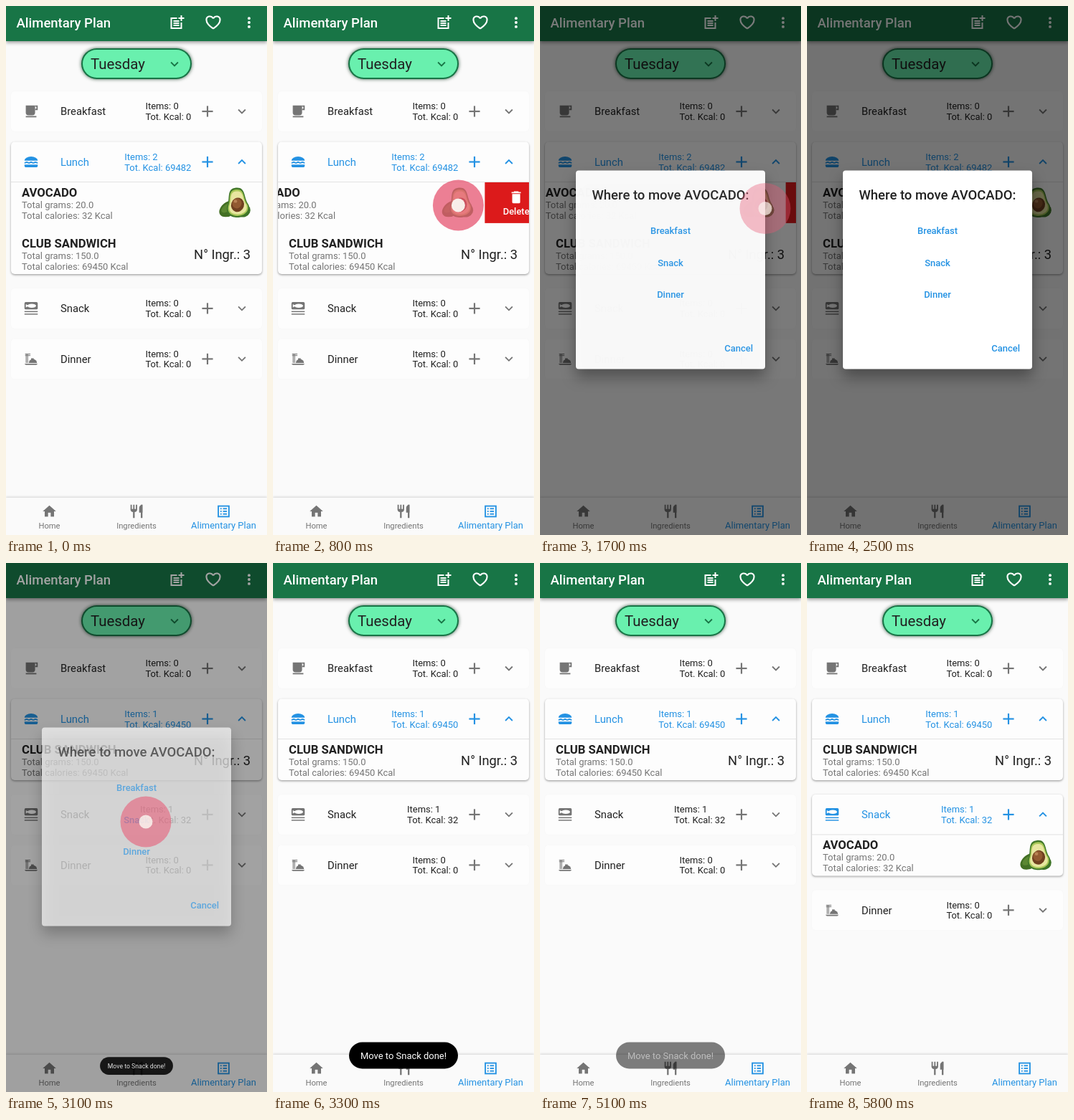
An HTML page with a canvas for the animation above (6 s loop, 364 by 738 pixels).

```html
<!DOCTYPE html>
<html lang="en">
<head>
<meta charset="utf-8">
<title>Alimentary Plan</title>
<style>
  html, body { margin: 0; width: 100%; height: 100%; overflow: hidden; background: #fafafa; }
  canvas { display: block; width: 364px; height: 738px; }
</style>
</head>
<body>
<canvas id="stage"></canvas>
<script>
const W = 364, H = 738, LOOP = 6000, STEP = 100;
const GREEN = '#187546', BLUE = '#2492e3', GREY = '#757575', INK = '#212121';
const CARD = '#fdfdfd', RED = '#dc1a1b', MOVE = '#10b853';
const BODY = 12.96, ROW = 71;

const canvas = document.getElementById('stage');
const dpr = window.devicePixelRatio || 1;
canvas.width = W * dpr;
canvas.height = H * dpr;
const ctx = canvas.getContext('2d');

// Timing: progress from 0 to 1, and easing on top of it
const ramp = (t, start, length) => Math.min(1, Math.max(0, (t - start) / length));
const easeOut = p => 1 - (1 - p) ** 2;
const easeBoth = p => p * p * (3 - 2 * p);
const pulse = (t, start, end) => Math.min(ramp(t, start - 100, 100), 1 - ramp(t, end - 200, 200));

// Shape helpers, all using the current fill and stroke
function bar(x, y, w, h, r = 0) {
  ctx.beginPath();
  ctx.roundRect(x, y, w, h, r);
  ctx.fill();
}

function trace(points) {
  ctx.beginPath();
  for (let i = 0; i < points.length; i += 2) ctx.lineTo(points[i], points[i + 1]);
}

function line(...points) {
  trace(points);
  ctx.stroke();
}

function poly(...points) {
  trace(points);
  ctx.fill();
}

function dome(x, y, rx, ry) {
  ctx.beginPath();
  ctx.ellipse(x, y, rx, ry, 0, Math.PI, 0);
  ctx.fill();
}

function oval(x, y, rx, ry, color, turn = 0) {
  ctx.beginPath();
  ctx.ellipse(x, y, rx, ry, turn, 0, Math.PI * 2);
  ctx.fillStyle = color;
  ctx.fill();
}

function rect(x, y, w, h, color) {
  ctx.fillStyle = color;
  ctx.fillRect(x, y, w, h);
}

function box(x, y, w, h, r, fill, [shade, blur, drop] = ['transparent', 0, 0]) {
  ctx.save();
  ctx.shadowColor = shade;
  ctx.shadowBlur = blur * dpr;
  ctx.shadowOffsetY = drop * dpr;
  ctx.fillStyle = fill;
  bar(x, y, w, h, r);
  ctx.restore();
}

// y is the middle of the capital letters
function text(str, x, y, size, color = INK, weight = 400, align = 'left') {
  ctx.font = `${weight} ${size}px Roboto, sans-serif`;
  ctx.textAlign = align;
  ctx.fillStyle = color;
  ctx.fillText(str, x, y + size * 0.355);
}

// Icons live in a 24 by 24 square
const icons = {
  add() {
    bar(5, 11, 14, 2);
    bar(11, 5, 2, 14);
  },
  chevron() { line(6.7, 9.3, 12, 14.6, 17.3, 9.3); },
  dots() { for (let y = 6; y <= 18; y += 6) bar(10, y - 2, 4, 4, 2); },
  note() {
    line(12, 6, 4, 6, 4, 20, 18, 20, 18, 12);
    bar(14, 5, 8, 2);
    bar(17, 2, 2, 8);
    for (let y = 9; y <= 15; y += 3) bar(7, y, 8, 2);
  },
  heart() {
    for (const side of [-1, 1]) {
      const x = d => 12 + side * d;
      ctx.beginPath();
      ctx.moveTo(12, 20);
      ctx.bezierCurveTo(x(7), 15.4, x(9), 12, x(9), 8.5);
      ctx.bezierCurveTo(x(9), 3.5, x(2.8), 2.3, 12, 6.7);
      ctx.stroke();
    }
  },
  home() {
    poly(2, 12, 12, 3, 22, 12);
    bar(5, 11, 14, 3);
    for (const x of [5, 14]) bar(x, 12, 5, 8);
  },
  fork() {
    for (const x of [3, 7, 11]) bar(x, 2, 2, 7);
    bar(3, 8.5, 10, 4.5, [0, 0, 4, 4]);
    bar(6.75, 12, 2.5, 10);
    bar(16, 2, 5, 12, [5, 0, 0, 0]);
    bar(18.5, 2, 2.5, 20);
  },
  list() {
    ctx.strokeRect(4, 4, 16, 16);
    for (let y = 7; y <= 15; y += 4) {
      bar(7, y, 2, 2);
      bar(11, y, 6, 2);
    }
  },
  bin() {
    bar(6, 7, 12, 14, [0, 0, 2, 2]);
    bar(5, 4, 14, 2);
    bar(8.5, 3, 7, 2);
  },
  folder() {
    bar(2, 6, 20, 14, 2);
    bar(2, 4, 9, 5, 2);
    ctx.fillStyle = MOVE;
    bar(10, 11, 5, 4);
    poly(14, 8, 19, 13, 14, 18);
  },
  cup() {
    bar(4, 3, 14, 15, [0, 0, 4, 4]);
    line(18, 4, 21, 4, 21, 9, 18, 9);
    bar(4, 19, 16, 2);
  },
  burger() {
    dome(12, 10, 10, 6);
    ctx.beginPath();
    for (let x = 2; x <= 22; x += 0.5) ctx.lineTo(x, 13 + 0.5 * Math.cos((x - 2) * 0.94));
    ctx.stroke();
    bar(2, 16, 20, 4, [0, 0, 2, 2]);
  },
  fish() {
    bar(2, 2.5, 20, 11, 2);
    for (const y of [16, 19.8]) bar(2, y, 20, 1.6);
    oval(13, 8, 6.5, 3, CARD);
    poly(4, 5.5, 9, 8, 4, 10.5);
  },
  bowl() {
    poly(2, 19, 22, 19, 20, 21, 4, 21);
    for (const y of [4, 6.3]) bar(3, y, 8, 1.1);
    for (const x of [4, 6.2]) bar(x, 4, 1.2, 14);
    dome(14.7, 18, 6.2, 5.5);
    bar(12, 11, 4, 2);
  }
};

function icon(name, cx, cy, color, size = 22.2, turn = 0) {
  ctx.save();
  ctx.translate(cx, cy);
  ctx.rotate(turn);
  ctx.scale(size / 24, size / 24);
  ctx.translate(-12, -12);
  ctx.fillStyle = ctx.strokeStyle = color;
  ctx.lineWidth = 2;
  icons[name]();
  ctx.restore();
}

function pear(color, scale) {
  ctx.save();
  ctx.translate(4, 2);
  ctx.rotate(-0.1);
  ctx.scale(scale, scale);
  ctx.beginPath();
  ctx.moveTo(0, -23);
  ctx.bezierCurveTo(14, -23, 9, -9, 15, 2);
  ctx.bezierCurveTo(22, 24, -22, 24, -15, 2);
  ctx.bezierCurveTo(-9, -9, -14, -23, 0, -23);
  ctx.fillStyle = color;
  ctx.fill();
  ctx.restore();
}

function avocado(cx, cy) {
  ctx.save();
  ctx.translate(cx, cy);
  oval(-7, 8, 16, 10, '#436f24', -0.55);
  oval(-10, 7, 10, 5, '#5b8732', -0.6);
  oval(12, 11, 10, 9, '#3d7427', -0.4);
  ['#41772a', '#a9c858', '#e8e6a0'].forEach((color, i) => pear(color, 1 - i * 0.11));
  oval(4, 3, 9, 10, '#704020', 0.3);
  oval(3, 1, 6.5, 7, '#925a31', 0.3);
  oval(1, -2, 2.4, 2.2, '#b98355');
  ctx.restore();
}

const AVOCADO = { name: 'AVOCADO', grams: '20.0', kcal: 32 };
const CLUB = { name: 'CLUB SANDWICH', grams: '150.0', kcal: 69450, parts: 3 };

function foodRow(top, food) {
  text(food.name, 22, top + 14, 16.67, INK, 700);
  text('Total grams: ' + food.grams, 22, top + 31.3, BODY, GREY);
  text(`Total calories: ${food.kcal} Kcal`, 22, top + 46, BODY, GREY);
  if (food.parts) text('N° Ingr.: ' + food.parts, 341, top + 29.8, 18.3, INK, 400, 'right');
  else avocado(319, top + 28.5);
}

function action(x, top, color, glyph, label) {
  rect(x, top, 87.5, 57, color);
  icon(glyph, x + 43.75, top + 21, '#fff');
  text(label, x + 43.75, top + 40, BODY, '#fff', 500, 'center');
}

function slideRow(top, food, shift) {
  ctx.save();
  ctx.beginPath();
  ctx.rect(7, top, 350, 57);
  ctx.clip();
  ctx.translate(-shift, 0);
  foodRow(top, food);
  action(357, top, RED, 'bin', 'Delete');
  action(444.5, top, MOVE, 'folder', 'Move');
  ctx.restore();
}

// Draws one meal card and returns the top of the next one
function meal(top, name, glyph, foods, open, shift = 0) {
  const cy = top + 28;
  const height = 56 + (57.5 + ROW * (foods.length - 1)) * open;
  const tint = open ? BLUE : GREY;
  const ink = open ? BLUE : INK;

  box(7, top, 350, height, 5, CARD, open ? ['rgba(0,0,0,.38)', 3, 1.2] : ['rgba(0,0,0,.03)', 2, 0]);
  icon(glyph, 35, cy, tint);
  text(name, 76, cy, 14.8, ink);
  const total = 'Tot. Kcal: ' + foods.reduce((sum, food) => sum + food.kcal, 0);
  ctx.font = `400 ${BODY}px Roboto, sans-serif`;
  const x = 258.3 - ctx.measureText(total).width;
  text('Items: ' + foods.length, x, cy - 7.3, BODY, ink);
  text(total, x, cy + 7.4, BODY, ink);
  icon('add', 281, cy, tint, 26);
  icon('chevron', 329, cy, tint, 22.2, Math.PI * open);

  if (open) {
    ctx.save();
    ctx.beginPath();
    ctx.rect(7, top + 55, 350, height - 55);
    ctx.clip();
    rect(7, top + 55.5, 350, 1, '#e2e2e2');
    foods.forEach((food, i) => {
      const y = top + 56.4 + i * ROW;
      if (food === AVOCADO) slideRow(y, food, shift);
      else foodRow(y, food);
    });
    ctx.restore();
  }
  return top + height + 14.5 + 5.4 * open;
}

function appBar() {
  box(0, -6, W, 55, 0, GREEN, ['rgba(0,0,0,.4)', 5, 2]);
  text('Alimentary Plan', 14.5, 23.5, 18.5, '#fff', 500);
  icon('note', 238.5, 23, '#fff', 24);
  icon('heart', 289, 23, '#fff', 25.5);
  icon('dots', 339, 23, '#fff', 23.5);
}

function dayPicker() {
  box(105, 59, 154, 43, 21.5, GREEN, ['rgba(0,45,20,.75)', 5, 0]);
  box(107, 61, 150, 39, 19.5, '#69f0ae');
  text('Tuesday', 118, 80.5, 20.4);
  icon('chevron', 235, 81, GREEN);
}

function navBar() {
  box(0, 686, W, 60, 0, '#fafafa', ['rgba(0,0,0,.16)', 3, -1]);
  const tab = (x, glyph, label, y, size, color) => {
    icon(glyph, x, 705, color);
    text(label, x, y, size, color, 400, 'center');
  };
  tab(60.5, 'home', 'Home', 725, 11.2, GREY);
  tab(182, 'fork', 'Ingredients', 725, 11.2, GREY);
  tab(303.5, 'list', 'Alimentary Plan', 724, BODY, BLUE);
}

function dialog(shown) {
  rect(0, 0, W, H, `rgba(0,0,0,${0.54 * shown})`);
  ctx.save();
  ctx.globalAlpha = shown;
  box(50, 229.5, 264, 277, 4, '#fff', ['rgba(0,0,0,.36)', 20, 11]);
  text('Where to move AVOCADO:', 182, 263, 18.5, INK, 500, 'center');
  ['Breakfast', 'Snack', 'Dinner'].forEach((name, i) =>
    text(name, 182, 313.7 + i * 44.4, BODY, BLUE, 500, 'center'));
  text('Cancel', 297, 477, BODY, BLUE, 500, 'right');
  ctx.restore();
}

function toast(t) {
  const scale = 0.45 + 0.55 * ramp(t, 3000, 250);
  ctx.save();
  ctx.globalAlpha = easeOut(ramp(t, 3000, 160)) - ramp(t, 5000, 200);
  ctx.translate(182, 687 + (1 - scale) * 44);
  ctx.scale(scale, scale);
  box(-76, -18.5, 152, 37, 18.5, '#000');
  text('Move to Snack done!', 0, 0, BODY, '#fff', 400, 'center');
  ctx.restore();
}

function touch(x, y, strength) {
  oval(x, y, 35.5, 35.5, `rgba(232,88,116,${0.76 * strength})`);
  oval(x, y, 9.5, 9.5, `rgba(250,246,240,${0.95 * Math.sqrt(strength)})`);
}

function draw(t) {
  ctx.setTransform(dpr, 0, 0, dpr, 0, 0);
  rect(0, 0, W, H, '#fafafa');

  const moved = t >= 3000;
  const shift = 175 * (easeBoth(ramp(t, 600, 500)) - easeOut(ramp(t, 1500, 280)));
  const snackOpen = easeBoth(ramp(t, 5300, 300));

  let top = meal(119, 'Breakfast', 'cup', [], 0);
  top = meal(top, 'Lunch', 'burger', moved ? [CLUB] : [AVOCADO, CLUB], 1, shift);
  top = meal(top, 'Snack', 'fish', moved ? [AVOCADO] : [], snackOpen);
  meal(top, 'Dinner', 'bowl', [], 0);
  appBar();
  dayPicker();
  navBar();
  dialog(easeOut(ramp(t, 1500, 250)) - ramp(t, 3000, 300));
  toast(t);

  touch(320 - shift, 278, pulse(t, 600, 1150));
  touch(314, 282.5, pulse(t, 1500, 1800));
  touch(195, 361, pulse(t, 2900, 3250));
  touch(329, 351, pulse(t, 5200, 5600));
}

function frame() {
  const t = performance.now() % LOOP;
  draw(Math.floor(t / STEP) * STEP);
  requestAnimationFrame(frame);
}
frame();
</script>
</body>
</html>
```
